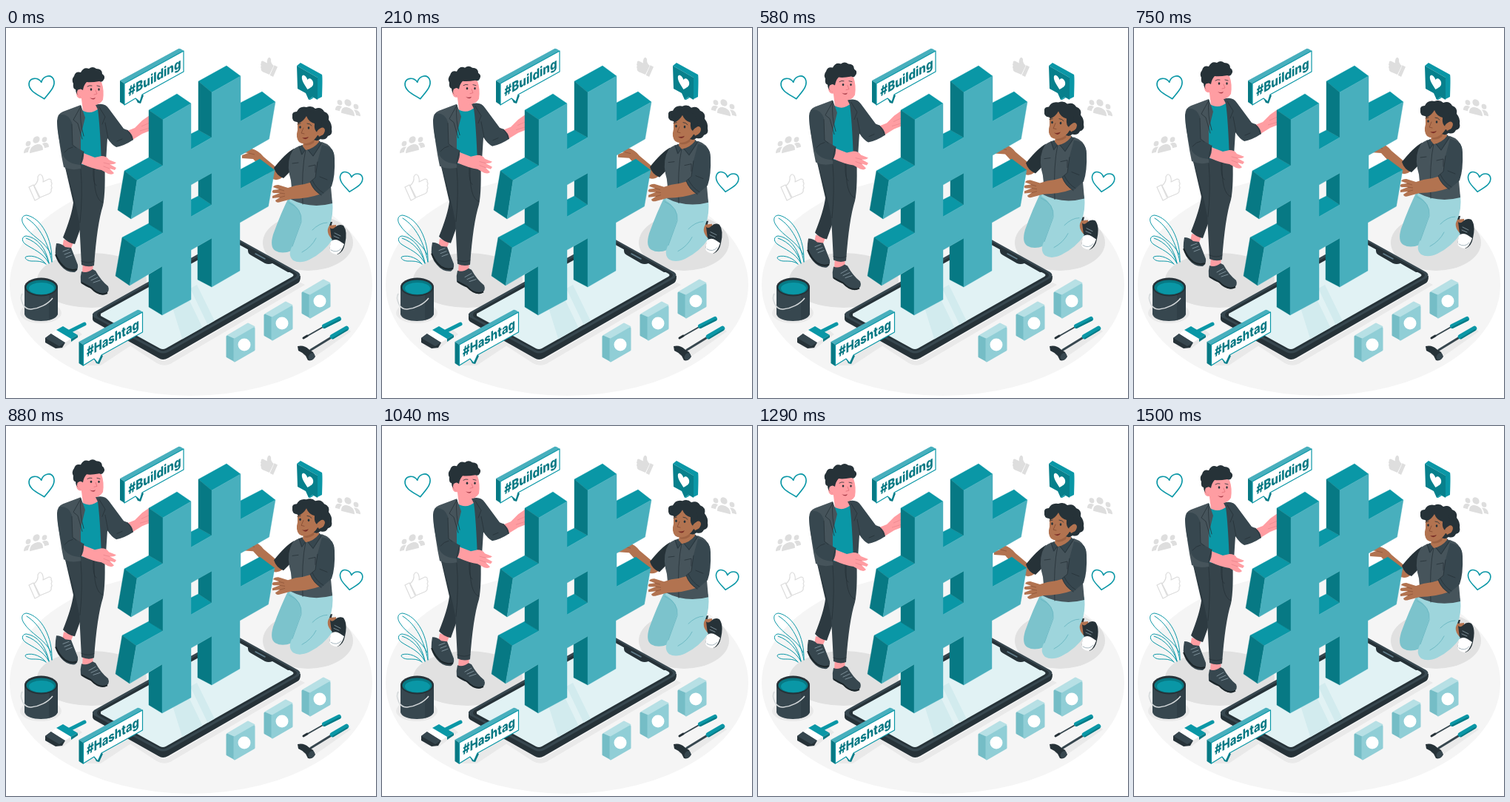
These frames come from a looping animation (500 px wide and 500 px high, 1540 ms). An HTML page:

```html
<!DOCTYPE html>
<html lang="en">
<head>
<meta charset="utf-8">
<title>Building a hashtag</title>
<style>
html, body { margin: 0; width: 100%; height: 100%; overflow: hidden; background: #fff; }
svg { display: block; width: 100%; height: 100%; }
.dark { fill: #37474f; }
.cloth { fill: #46545b; }
.ink { fill: #263238; }
.teal { fill: #0a97a6; }
.deep { fill: #077984; }
.front { fill: #48afbd; }
.skin { fill: #ff9da2; }
.brown { fill: #b27350; }
.pants { fill: #9ed5dc; }
.grey { fill: #dedede; }
.white { fill: #fff; }
.line { fill: none; stroke: #263238; stroke-width: .8; stroke-linecap: round; stroke-linejoin: round; }
.tl { fill: none; stroke: #0a97a6; stroke-linecap: round; stroke-linejoin: round; }
.label { font: 800 18px Inter, Roboto, sans-serif; fill: #077984; text-anchor: middle; }
</style>
</head>
<body>
<svg viewBox="0 0 500 500">
<defs>
  <path id="heart" d="M0 14C-6 8-16 2-14-7C-12-14-3-13 0-6C3-13 12-14 14-7C16 2 6 8 0 14Z"/>
  <g id="people" class="grey">
    <circle cx="-11" cy="-2.500" r="3.400"/><circle cx="11" cy="-2.500" r="3.400"/><circle cy="-5" r="4.600"/>
    <path d="M-9 11C-9 4-5 1.500 0 1.500S9 4 9 11Z"/>
    <path d="M-17 9C-17 3-13 1-8 2.500C-10 5-11 7-11 9ZM17 9C17 3 13 1 8 2.500C10 5 11 7 11 9Z"/>
  </g>
  <g id="thumb" stroke-linejoin="round">
    <path d="M0 19L6 16L14 34L8 37Z"/>
    <path d="M7 17Q13 12 12 5Q15-1 18 4Q20 9 19 12L27 8Q31 8 30 12Q32 14 30 17Q32 20 30 22Q31 26 27 28L15 33Z"/>
  </g>
  <g id="cube" stroke-linejoin="round" stroke-width="3">
    <path fill="#b7e0e5" stroke="#b7e0e5" d="M1-8L28-24L36-20L10-5Z"/>
    <path fill="#75bdc6" stroke="#75bdc6" d="M0-7L9-3V25L0 20Z"/>
    <path fill="#90ced6" stroke="#90ced6" d="M10-3L36-18V11L10 26Z"/>
    <circle class="white" cx="23" cy="4" r="8.5"/>
  </g>
  <g id="sign" stroke-linejoin="round">
    <path class="front" d="M-6-4L73-47Q75-48 80-44L0 0Z"/>
    <path class="deep" d="M-6-4L0 0V29L-6 25Z"/>
  </g>
  <clipPath id="screen"><path d="M128 386L302 290Q306 288 310 290L387 332Q390 334 387 336L216 433Q212 435 208 433L128 389Z"/></clipPath>
</defs>

<!-- ground -->
<ellipse cx="250" cy="347" rx="245" ry="150" fill="#f5f5f5"/>
<g fill="#e1e1e1">
  <ellipse cx="116" cy="341" rx="74" ry="37"/>
  <ellipse cx="408" cy="290" rx="61" ry="38"/>
  <g fill="#e9e9e9">
    <ellipse cx="47" cy="385" rx="28" ry="14"/>
    <path d="M56 430L96 408L103 414L76 434ZM104 456L130 442L188 409L184 419L128 456Z"/>
    <path d="M118 397L210 449Q214 451 219 448L398 344L404 347L222 454Q213 458 204 453Z"/>
    <path d="M400 441L462 407L466 410L412 448Z"/>
  </g>
</g>

<!-- floating icons -->
<use href="#heart" transform="translate(49 80) rotate(-10) scale(1.2 1.14)" class="tl" stroke-width="1.4"/>
<use href="#heart" transform="translate(466 207.500) rotate(8) scale(1.07 1)" class="tl" stroke-width="1.5"/>
<use href="#people" transform="translate(41 156) skewY(-14)"/>
<use href="#people" transform="translate(462 106) skewY(14)"/>
<use href="#thumb" transform="translate(367 38.500) scale(-.74 .74)" class="grey"/>
<use href="#thumb" x="31" y="196" fill="#fff" stroke="#dcdcdc" stroke-width="1.200"/>

<!-- heart bubble -->
<path class="teal" d="M393 51L398 47L427 63Q428 65 427 93L421 96V67Z"/>
<path fill="#07808c" d="M393 51L421 67V97L414 93L409 97L405 88L394 82Z"/>
<path class="teal" d="M409 97L414 93L416 94L411 97Z"/>
<use href="#heart" transform="matrix(.54 .28 0 .65 407.5 74)" class="white"/>

<!-- plant -->
<g class="tl" stroke-width="1">
  <path d="M62 316C63 285 48 257 28 253C21 253 20 260 24 266C33 281 53 288 61 306"/>
  <path d="M28 257C46 268 57 291 62 316"/>
  <path d="M58 318C54 297 42 283 27 281C21 282 21 288 26 292C36 299 50 303 58 318M27 284C42 289 53 302 58 317"/>
  <path d="M54 319C49 312 37 306 27 309C24 311 29 315 35 315C43 315 49 315 54 319"/>
</g>

<!-- bucket -->
<path class="dark" d="M25 350V387C28 399 66 399 70 387V350Z"/>
<path class="ink" d="M58 359Q68 356 70 350V387Q66 393 58 395Z" opacity=".35"/>
<ellipse cx="47.500" cy="350" rx="22.500" ry="12.500" class="ink"/>
<ellipse cx="47.500" cy="350.500" rx="20" ry="10" class="deep"/>
<ellipse cx="48" cy="352" rx="17" ry="8" class="teal"/>
<path d="M22 359C18 365 23 381 34 380C45 379 57 373 63 365" fill="none" stroke="#d4d8da" stroke-width="1.500"/>

<!-- brush -->
<path class="ink" d="M53 419L61 413L80 425L76 432L67 433L53 425Z"/>
<path class="dark" d="M53 419L61 413L80 425L72 430Z"/>
<path class="white" d="M61 413L70 407L89 419L80 425Z"/>
<path class="teal" d="M68 408L77 403L97 415L88 420Z"/>
<path class="deep" d="M88 420L97 415V418L88 424Z"/>
<path d="M86 410L106 400" fill="none" stroke="#0a97a6" stroke-width="5" stroke-linecap="round"/>

<!-- tools -->
<g fill="none" stroke-linecap="round">
  <path d="M404 418L432 402" stroke="#37474f" stroke-width="2"/>
  <path d="M402 419L407 416" stroke="#263238" stroke-width="3"/>
  <path d="M430 403L450 393" stroke="#0a97a6" stroke-width="6"/>
  <path d="M430 405L451 394.500" stroke="#077984" stroke-width="2"/>
  <path d="M412 435L443 416" stroke="#37474f" stroke-width="3"/>
  <path d="M441 417L460 406" stroke="#0a97a6" stroke-width="6.500"/>
  <path d="M442 419.500L461 408" stroke="#077984" stroke-width="2"/>
</g>
<path class="ink" d="M394 430Q403 428 409 434L415 438L418 444Q414 451 408 449L405 443Q400 438 395 436Z"/>
<ellipse cx="413" cy="444" rx="4" ry="5" class="dark" transform="rotate(30 413 444)"/>

<!-- cubes -->
<use href="#cube" x="299" y="424"/>
<use href="#cube" x="350" y="395"/>
<use href="#cube" x="401" y="365"/>

<!-- phone -->
<path class="ink" d="M117 386V393Q117 396 121 398L206 446Q212 450 219 446L394 345Q398 343 398 335Z"/>
<path class="dark" d="M119 384L298 284Q305 280 312 284L395 330Q400 334 395 338L219 438Q212 441 206 438L119 391Q115 388 119 384Z"/>
<path class="ink" d="M125 384L300 287Q306 284 312 287L391 331Q395 334 391 337L218 435Q212 438 207 435L125 391Q121 388 125 384Z"/>
<g clip-path="url(#screen)">
  <path fill="#e1f2f4" d="M100 280H400V450H100Z"/>
  <path fill="#d2ebee" d="M221 365L241 354L268 410L240 426ZM249 352L258 347L282 396L273 402Z"/>
</g>
<path class="ink" d="M320 294L327 299Q326 304 331 307L350 318Q355 320 360 318L381 330L389 330L318 290Z"/>
<path d="M337 305L350 312" stroke="#607d8b" stroke-width="1.500" stroke-linecap="round"/>

<!-- upper sign -->
<use href="#sign" x="160" y="75"/>
<path d="M160 75L240 31V59L184 90L181 100L175 95L160 104Z" class="white" stroke="#0a97a6" stroke-width="1.200" stroke-linejoin="round"/>
<path class="deep" d="M175 95L181 100L184 90L186 91L182 102L178 101Z"/>
<text class="label" transform="matrix(.84 -.468 0 1 201 73)">#Building</text>

<!-- standing man -->
<g class="rise">
  <path class="skin" d="M164 139L174 135L184 125L194 118V139L184 143L171 151Z"/>
  <path d="M183 133L194 128M181 139L194 135" stroke="#e9858c" stroke-width=".7"/>
  <path class="skin" d="M78 286L91 290L87 300L76 297Z"/>
  <path class="dark" d="M68 291Q75 291 80 296L88 297L97 320Q98 327 93 330Q82 331 74 321Q65 311 67 298Z"/>
  <path class="line" d="M77 302L85 299M79 306L87 303M81 310L89 307" style="stroke:#90a4ae"/>
  <path d="M67 306Q72 318 80 324Q88 329 96 326" fill="none" stroke="#1b2529" stroke-width="2"/>
  <path fill="#2d3a41" d="M79 184L91 236Q89 253 77 283Q83 290 93 292L107 253L119 190Z"/>
  <path class="skin" d="M104 316H118L117 331L103 331Z"/>
  <path class="dark" d="M102 329Q109 332 117 326L121 328Q128 341 138 349Q141 356 134 360Q126 363 116 352Q106 349 101 344Q100 336 102 329Z"/>
  <path d="M102 344L115 351Q126 363 137 358" fill="none" stroke="#1b2529" stroke-width="2"/>
  <path class="line" d="M112 338L121 333M115 341L124 337M118 344L127 341" style="stroke:#90a4ae"/>
  <path fill="#36444b" d="M80 182L133 176Q135 221 131 240Q123 265 119 321Q111 324 102 320L99 262Q92 225 80 188Z"/>
  <path class="line" d="M101 191Q104 225 100 263M118 189Q117 210 122 213M119 190Q118 232 131 236M102 315Q112 319 119 315"/>

  <path class="skin" d="M101 88L104 112Q115 121 126 111L121 94Z"/>
  <path class="teal" d="M101 110Q114 119 126 108L131 124L130 181Q117 188 100 184Z"/>
  <path class="dark" d="M121 104Q133 100 139 109L159 136L164 138Q171 143 172 151Q160 159 149 161Q143 158 137 149L135 180L129 184Q127 130 124 110Z"/>
  <path class="line" d="M138 149L134 128M164 138Q170 145 171 151M126 107L134 120L130 130M150 153L157 150"/>
  <path class="cloth" d="M101 104L77 113Q69 116 69 126Q72 160 78 188Q88 193 101 190V145L107 121Z"/>
  <path class="line" d="M101 106Q99 126 105 146M101 106L91 124L97 129L103 150"/>
  <path class="skin" d="M102 168L120 175L129 173Q136 173 139 178L149 182Q146 185 140 184L149 189L147 192L140 190L146 196Q144 199 138 197L129 192Q119 191 101 183Z"/>
  <path class="line" d="M132 182L140 184M132 187L140 190" style="stroke:#e9858c"/>
  <path class="dark" d="M72 117Q84 115 89 128L90 158L105 167Q106 177 101 185Q83 184 77 172Q69 145 69 126Z"/>
  <path class="line" d="M89 130L90 158L95 162M105 167Q102 176 101 185M79 168Q84 162 90 161"/>

  <path class="skin" d="M99 79Q111 66 129 73Q133 84 131 97Q127 104 119 104Q107 103 102 95Q96 96 95 89Q95 84 100 85Z"/>
  <path class="ink" d="M101 93Q94 90 94 83Q90 82 91 75Q88 70 92 65Q94 58 101 60Q105 52 112 55Q117 51 122 55Q130 55 130 62Q135 65 132 70Q130 74 126 72Q115 74 109 73Q105 77 104 84Q99 80 98 86Z"/>
  <path class="skin" d="M102 84Q96 81 96 88Q97 93 102 93Z"/>
  <ellipse cx="115" cy="83" rx="1.300" ry="1.700" class="ink"/><ellipse cx="125.500" cy="83" rx="1.200" ry="1.700" class="ink"/>
  <path class="line" d="M110 79Q113 77 116 78M123 78L127 79"/>
  <path class="line" d="M121 84L123 89L119 90" style="stroke:#e06f79"/>
  <path d="M113 94Q117 96 121 94Q119 99 113 94Z" fill="#a93f4c"/>
</g>

<!-- woman's far arm -->
<g class="rise">
  <path class="brown" d="M367 190L348 174Q342 166 332 163Q325 160 320 164L319 168L327 169L319 172V176L334 177L357 202Q363 207 370 204L378 199Z"/>
  <path d="M328 169L336 171" stroke="#8f563a" stroke-width=".8"/>
  <path class="ink" d="M389 163Q378 169 362 189Q365 199 375 203L391 187Z"/>
</g>

<!-- hash -->
<g stroke-width=".4">
  <g class="teal" stroke="#0a97a6">
    <path d="M193 111L231 89L250 102L212 124ZM260 72L298 51L317 65L278 87Z"/>
    <path d="M160 193L193 175L212 186L177 206ZM250 143L260 138L278 148L250 164ZM317 101L346 86L364 100L317 126Z"/>
    <path d="M157 283L193 264L212 277L176 297ZM250 232L260 227L278 239L250 255ZM317 191L343 177L363 192L317 217Z"/>
  </g>
  <g class="deep" stroke="#077984">
    <path d="M193 111L212 124V186L193 175ZM260 72L278 87V148L260 138Z"/>
    <path d="M160 193L177 206L169 258L151 246ZM157 283L176 297L167 348L148 335Z"/>
    <path d="M193 244L212 233V277L193 265ZM260 206L278 196V239L260 227Z"/>
    <path d="M193 333L211 322V388L193 377ZM259 295L278 284V350L259 340Z"/>
  </g>
  <path class="front" stroke="#48afbd" fill-rule="evenodd" d="M212 124L250 102V164L278 148V87L317 65V126L364 100L355.500 150L317 172V217L363 192L354.500 241L316 263V328L278 350V284L250 300V367L211 388V322L167 348L176 297L212 277V233L169 258L177 206L212 186ZM250 212V255L278 239V196Z"/>
</g>

<!-- kneeling woman -->
<g class="rise">
  <path class="ink" d="M429 262H441L439 270L431 276Z"/>
  <path class="brown" d="M436 267L446 266L447 276L440 286L431 281Z"/>
  <path class="ink" d="M438 270Q441 273 445 269Q450 264 456 267Q462 275 458 292Q456 303 448 306L437 300L440 286Z"/>
  <path class="white" d="M439 288Q445 284 451 288L457 292Q453 304 447 306Q439 305 437 300Z"/>
  <path class="line" d="M439 300Q447 305 453 298M443 281L450 284M444 277L452 281" style="stroke:#90a4ae"/>
  <path fill="#7cc3cc" d="M383 227Q371 251 361 279Q356 296 364 301Q373 306 386 301L410 245Z"/>
  <path class="pants" d="M386 226L441 233Q443 253 437 267Q431 276 441 286Q430 303 410 313Q397 319 388 314Q380 307 387 294L398 263Q402 246 383 234Z"/>
  <path class="line" d="M382 236Q401 244 399 262L387 295M414 273Q424 263 434 263M400 303Q413 296 419 284" style="stroke:#62b3be"/>

  <path class="cloth" d="M388 164Q396 158 405 158L427 154Q440 158 443 170Q442 189 438 203L441 237Q411 245 384 231Q388 213 383 198Q379 179 388 164Z"/>
  <path class="dark" d="M400 158L396 161L399 172L406 163L415 174L427 156L423 152L406 164Z"/>
  <path class="line" d="M405 164Q399 192 401 238M396 160L400 171L406 162L415 173L426 156M387 183L395 182M409 187L418 185V195"/>
  <path class="brown" d="M403 146L401 160L405 165Q416 163 423 154L420 140Z"/>
  <path fill="#8f563a" d="M403 154Q411 156 418 148L416 155Q409 160 403 158Z" opacity=".6"/>

  <path class="brown" d="M414 208Q402 212 391 213L381 216L368 212Q362 212 361 215L369 218L361 219Q358 222 362 223L370 223L360 227V230L370 229L364 233Q365 237 371 235L386 231Q407 231 426 224Z"/>
  <path d="M369 218L376 220M370 223L377 224M370 229L377 227" stroke="#8f563a" stroke-width=".8"/>
  <path class="dark" d="M427 158Q444 160 444 176Q445 200 440 214L426 226Q415 220 411 208L418 202L420 184Z"/>
  <path class="line" d="M421 181L418 202L411 208Q415 219 426 226M414 206Q419 217 429 223M434 205L424 201"/>

  <path class="ink" d="M393 127Q386 126 387 119Q386 113 393 113Q397 105 406 107Q413 104 418 109Q426 106 430 113Q438 116 436 124Q441 130 440 137Q442 144 435 146Q432 152 425 150Q419 155 413 149L400 129Z"/>
  <path class="brown" d="M394 128Q401 125 406 118Q414 124 419 131L423 136Q430 132 431 138Q430 147 421 145Q417 152 410 155Q401 158 396 154Q391 148 394 138Z"/>
  <path class="ink" d="M392 124Q391 115 400 113Q411 109 420 117Q429 124 426 134L421 141Q416 139 417 129Q409 127 406 119Q402 126 395 129Z"/>
  <path class="brown" d="M420 140Q425 133 430 137Q432 143 423 147Z"/>
  <ellipse cx="397.500" cy="134" rx="1.300" ry="1.800" class="ink"/><ellipse cx="409" cy="135" rx="1.300" ry="1.800" class="ink"/>
  <path class="line" d="M394 130L398 129M407 129Q411 129 413 132"/>
  <path class="line" d="M402 135L399 142L403 143" style="stroke:#824a32"/>
  <path d="M400 148Q404 149 409 147Q406 153 400 148Z" fill="#7b3028"/>
</g>

<!-- lower sign -->
<use href="#sign" x="104.500" y="428"/>
<path d="M104.500 428L184.500 384V411L129 442L124 453L119 447L104.500 456Z" class="white" stroke="#0a97a6" stroke-width="1.200" stroke-linejoin="round"/>
<path class="deep" d="M119 447L124 453L129 442L131 443L126 454L122 453Z"/>
<text class="label" transform="matrix(.82 -.457 0 1 144.500 425)">#Hashtag</text>
</svg>
<script>
const LOOP = 1540, FPS = 24, STEPS = 37, LIFT = 8;
const figures = document.querySelectorAll(".rise");
const start = performance.now();

function draw(now) {
  const t = Math.max(0, now - start) % LOOP;
  const step = Math.min(STEPS - 1, Math.floor((t + 2) * FPS / 1000));
  const y = -LIFT * (1 - Math.cos(2 * Math.PI * step / STEPS)) / 2;
  figures.forEach(g => g.setAttribute("transform", `translate(0 ${y.toFixed(2)})`));
  requestAnimationFrame(draw);
}
draw(start);
</script>
</body>
</html>
```
